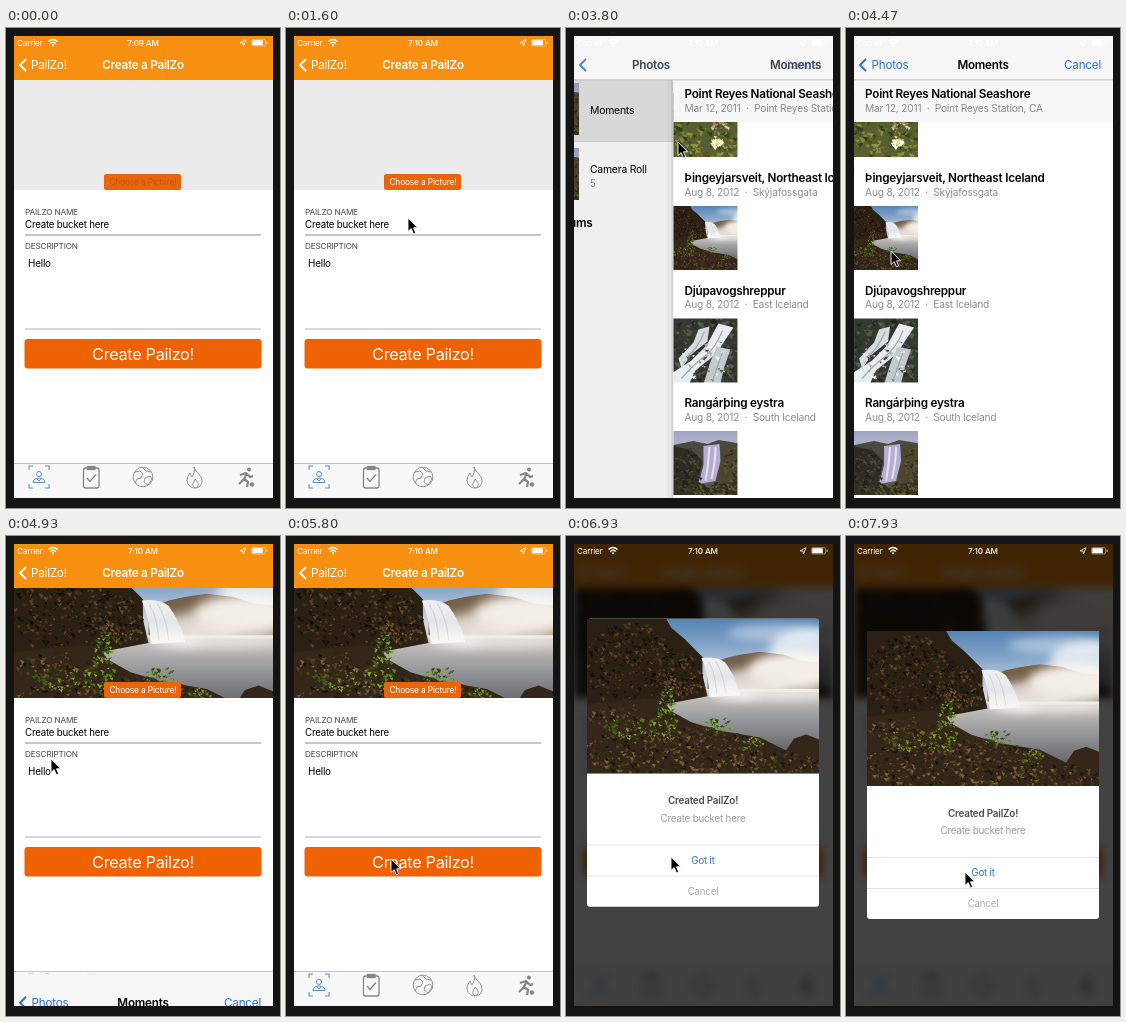
An HTML page that plays this animation: 274x480 px, repeating every 8000 ms.

```html
<!DOCTYPE html>
<html lang="en">
<head>
<meta charset="utf-8">
<style>
  html, body { margin: 0; width: 100%; height: 100%; overflow: hidden; background: #141414; }
  svg { display: block; width: 100%; height: 100%; }
  text { font-family: Inter, Roboto, sans-serif; letter-spacing: -.02em; white-space: pre; }
</style>
</head>
<body>
<svg id="stage" viewBox="0 0 274 480"></svg>
<script>
const LOOP = 8000, BLUE = '#2f6fd6', ORANGE = '#f79010', GREY = '#8b8b8f';
const $ = id => document.getElementById(id);

// Seeded random numbers for rocks and leaves
let seed = 7;
const rand = () => (seed = seed * 16807 % 2147483647) / 2147483647;

const rect = (x, y, w, h, fill, extra = '') =>
  `<rect x="${x}" y="${y}" width="${w}" height="${h}" fill="${fill}" ${extra}/>`;
const poly = (points, fill, extra = '') => `<polygon points="${points}" fill="${fill}" ${extra}/>`;
const mist = (cx, cy, rx, ry, fill, opacity) =>
  `<ellipse cx="${cx}" cy="${cy}" rx="${rx}" ry="${ry}" fill="${fill}" opacity="${opacity}" filter="url(#soft)"/>`;
const line = (d, stroke, width = 1, extra = '') =>
  `<path d="${d}" fill="none" stroke="${stroke}" stroke-width="${width}" ${extra}/>`;
const group = (id, body) => `<g id="${id}">${body}</g>`;
// Text is placed by the middle of its capitals
const text = (x, y, size, str, { fill = '#000', weight = 400, anchor = 'start', id = '' } = {}) =>
  `<text x="${x}" y="${y + size * .36}" font-size="${size}" fill="${fill}" font-weight="${weight}" text-anchor="${anchor}" ${id && `id="${id}"`}>${str}</text>`;
const photo = (id, x, y, w, h) => `<use href="#${id}" x="${x}" y="${y}" width="${w}" height="${h}"/>`;
const symbol = (id, w, h, body) =>
  `<symbol id="${id}" viewBox="0 0 ${w} ${h}" preserveAspectRatio="xMidYMid slice"><g filter="url(#lens)">${body}</g></symbol>`;
const gradient = (id, ...colors) => `<linearGradient id="${id}" x2="0" y2="1">` +
  colors.map((c, i) => `<stop offset="${i / (colors.length - 1)}" stop-color="${c}"/>`).join('') + '</linearGradient>';

// Scatter small shards over an ellipse, one path for each colour
function specks(n, cx, cy, rx, ry, size, colors) {
  const paths = colors.map(() => '');
  for (let i = 0; i < n; i++) {
    const a = rand() * 6.283, r = Math.sqrt(rand()), s = size * (.5 + rand()), lean = (rand() - .5) * s;
    const x = cx + rx * r * Math.cos(a), y = cy + ry * r * Math.sin(a);
    paths[i % colors.length] += `M${x.toFixed(1)} ${y.toFixed(1)}l${s.toFixed(1)} ${lean.toFixed(1)} ${(-s * .4).toFixed(1)} ${(s * .7).toFixed(1)}z`;
  }
  return paths.map((d, i) => `<path d="${d}" fill="${colors[i]}"/>`).join('');
}

const rock = ['#46331c', '#130e08', '#5c4424', '#1d150c'];
const earth = ['#5e4526', '#1a130b', '#7d6038', '#2c2013', '#463a1b'];
const leaf = ['#5f8424', '#3f5f18', '#86a436', '#2d4212'];

const landscape = symbol('landscape', 231, 154,
  rect(-5, -5, 241, 90, 'url(#sky)') + mist(190, 14, 50, 9, '#fff', .4) + mist(222, 30, 40, 20, '#fff', .7) +
  poly('120,46 138,39 152,36 172,33 196,36 214,42 236,44 236,70 120,70', '#75614a') +
  mist(206, 52, 46, 19, '#faf6f0', .95) + mist(165, 63, 36, 13, '#f0ebe4', .85) +
  rect(-5, 73, 241, 86, 'url(#lake)') + mist(190, 75, 55, 6, '#f4f1ec', .8) +
  poly('-5,-5 76,-5 84,9 97,20 115,38 115,56 120,77 62,88 -5,104', '#2b2014') +
  specks(320, 42, 45, 45, 42, 3.4, rock) + specks(110, 88, 54, 24, 22, 3.4, rock) +
  specks(80, 94, 66, 20, 9, 3, ['#745a33', '#4e3b21', '#2b2014']) +
  '<path d="M114 39Q130 37 138 44Q147 56 153 76L122 78Q121 55 114 39z" fill="url(#fall)"/>' +
  line('M121 43Q128 54 129 74M128 42Q136 55 138 74', '#cfd2d6', 1) + mist(146, 75, 24, 5, '#f7f5f2', .85) +
  poly('-5,86 38,81 74,79 84,92 104,103 130,111 172,118 198,131 206,119 218,115 236,122 236,159 -5,159', '#34271a') +
  specks(480, 84, 131, 92, 25, 3.6, earth) + specks(130, 185, 143, 44, 12, 3.6, earth) +
  specks(80, 35, 97, 34, 12, 3.4, earth) +
  specks(90, 45, 108, 30, 11, 2.8, leaf) + specks(95, 78, 95, 9, 27, 3.2, leaf) +
  specks(50, 128, 106, 15, 7, 3, leaf) + specks(45, 160, 124, 15, 7, 2.8, leaf));

const flowers = symbol('flowers', 64, 64,
  rect(-5, -5, 74, 74, '#56602e') +
  specks(260, 32, 32, 40, 40, 5, ['#7f8a3b', '#343d1d', '#8d9548', '#48521f', '#6b5a38']) +
  specks(14, 46, 32, 12, 4, 3, ['#c98b9b', '#dfc1bd']) +
  specks(22, 42, 48, 6, 6, 4.5, ['#fffbe0', '#f1dd6a', '#fff']));

const cascade = symbol('cascade', 64, 64,
  rect(-5, -5, 74, 74, '#363932') +
  specks(200, 32, 30, 40, 38, 5, ['#24271f', '#4d5636', '#5b5f59', '#30332d']) +
  poly('45,5 60,9 50,24 43,35 22,52 14,69 -5,69 -5,57 18,42 33,27', '#e9edf0') +
  poly('25,11 36,8 34,23 19,35 8,50 5,40 20,24', '#d5dbdf') +
  poly('43,28 57,31 51,48 46,69 29,69 36,46', '#c2cacd') +
  specks(45, 30, 40, 26, 24, 3.5, ['#f7f9fa', '#a9b2b5', '#4b504a']) +
  line('M49 12Q42 30 31 38T8 60M31 13Q24 30 14 38M49 34L39 62', '#9fa9ad', 1.2));

const gorge = symbol('gorge', 64, 64,
  rect(-5, -5, 74, 74, 'url(#dusk)') +
  poly('-5,15 20,10 34,13 45,9 69,13 69,69 -5,69', '#4b4a42') +
  poly('-5,14 18,19 29,30 25,50 -5,56', '#2c2b24') +
  poly('49,17 69,12 69,69 34,50 47,37', '#4c4530') +
  poly('30,15 46,13 47,30 42,50 25,53 30,34', '#b5aed2') +
  line('M36 16Q35 34 32 50M42 16Q42 30 38 48', '#e6e2f5', 2) + mist(33, 52, 9, 2, '#b9b3cf', .7) +
  poly('-5,51 18,49 34,55 69,49 69,69 -5,69', '#33311f') +
  specks(120, 12, 39, 14, 22, 3.5, ['#202018', '#494c30', '#38372d']) +
  specks(90, 42, 58, 24, 7, 3.5, ['#4d5a2a', '#292717', '#65583a']) +
  specks(45, 57, 33, 8, 17, 3.5, ['#5d5b33', '#302d20']));

const centered = { anchor: 'middle' };
const title = { anchor: 'middle', weight: 600 };
const chevron = (x, y, color) => line(`M${x + 6} ${y - 6}l-6 6 6 6`, color, 1.9);
const disclosure = y => line(`M251 ${y - 4}l4 4-4 4`, '#c5c5ca', 1.5);

const tabIcons =
  line('M23 442v-4h4M39 438h4v4M43 456v4h-4M27 460h-4v-4', '#5b8fd6', 1.1) +
  line('M30.500 446a2.500 2.500 0 1 1 5 0a2.500 2.500 0 1 1-5 0M27 454.500c0-6 12-6 12 0zM31 451l2 2 2-2', '#5b8fd6', 1) +
  `<g fill="none" stroke="#868686" stroke-width="1.3">
    <rect x="77.500" y="440" width="15.500" height="20" rx="2"/><rect x="81.500" y="438.500" width="7.500" height="3" fill="#868686"/><path d="M81 450l3 3.500 6-7"/>
    <g stroke-width=".9"><circle cx="137" cy="449" r="9.800"/>
    <path d="M129 444l5-1 3 3-2 4-4 1-2 4M137 440l3 3 5 1M139 450l5-2 2 3-4 6-4-3z"/>
    <path d="M188 439c2 6 8 8 8 14c0 4-3 7-7 7s-8-3-8-8c0-3 2-5 3-7c1 2 1 3 2 4c2-3 3-6 2-10zM189 460c-5-4 0-6 0-9c3 3 5 6 1 9"/></g>
    <path stroke-width="2.200" stroke-linejoin="round" d="M241 445l-3 6 4 3-1 5M238 451l-5 5M234 447l6-2 4 4 3-1"/>
  </g><circle cx="243" cy="441.500" r="2" fill="#868686"/><circle cx="246" cy="456.500" r="2.300" fill="#868686"/>`;

// Backgrounds run past the screen so that the blur has no dark rim
const form =
  rect(-12, -12, 298, 504, '#fff') + rect(-12, -12, 298, 64, ORANGE) +
  chevron(14, 37, '#fff') + text(25, 37, 11.7, 'PailZo!', { fill: '#fff' }) +
  text(137, 37, 11.7, 'Create a PailZo', { ...title, fill: '#fff' }) +
  rect(-12, 52, 298, 110, '#ececec') + group('hero', photo('landscape', 8, 52, 259, 110)) +
  rect(98, 146, 77, 16, '#e8650c', 'rx="2"') +
  text(137, 154, 8.4, 'Choose a Picture!', { ...centered, id: 'choose' }) +
  text(19, 184, 8.2, 'PAILZO NAME', { fill: '#444' }) + text(19, 197, 9.7, 'Create bucket here') +
  rect(19, 206.5, 236, 1, '#8e8e8e') +
  text(19, 218.5, 8.2, 'DESCRIPTION', { fill: '#444' }) + text(22, 235.5, 9.9, 'Hello') +
  rect(19, 300.5, 236, 1, '#b0b0b0') +
  rect(18.5, 311, 237, 29.5, '#ee6203', 'rx="3"') +
  text(137, 326, 16.3, 'Create Pailzo!', { ...centered, fill: '#fff' }) +
  rect(-12, 435, 298, 57, '#f8f8f8') + rect(-12, 435, 298, .8, '#b8b8b8') + tabIcons;

const albums =
  rect(8, 52, 259, 418, '#fff') + rect(8, 52, 259, 61, '#e6e6e6', 'id="pressed"') +
  photo('gorge', 13, 55, 48, 52) + text(72, 82, 10.4, 'Moments') + disclosure(83) +
  rect(13, 113, 254, .8, '#cfcfd2') +
  photo('gorge', 13, 120, 48, 52) + text(72, 141, 10.4, 'Camera Roll') +
  text(72, 155.5, 9.8, '5', { fill: GREY }) + disclosure(147) +
  text(13, 194.5, 11.7, 'My Albums', { weight: 600 }) +
  rect(8, 52, 400, 418, '#000', 'id="dim"');

const section = (y, name, date, place, image) =>
  photo(image, 8, y + 28, 64, 64) + text(19, y, 11.7, name, { weight: 600 }) +
  text(19, y + 14, 10.2, `${date}\u00a0\u00a0·\u00a0\u00a0${place}`, { fill: GREY });

const moments =
  rect(2, 52, 6, 418, '#000', 'opacity=".04"') + rect(6, 52, 2, 418, '#000', 'opacity=".08"') +
  rect(8, 52, 259, 418, '#fff') + photo('flowers', 8, 65, 64, 64) +
  rect(8, 52, 259, 42, '#f7f7f7') +
  text(19, 66, 11.7, 'Point Reyes National Seashore', { weight: 600 }) +
  text(19, 80, 10.2, 'Mar 12, 2011\u00a0\u00a0·\u00a0\u00a0Point Reyes Station, CA', { fill: GREY }) +
  section(150, 'Þingeyjarsveit, Northeast Iceland', 'Aug 8, 2012', 'Skýjafossgata', 'landscape') +
  section(262.5, 'Djúpavogshreppur', 'Aug 8, 2012', 'East Iceland', 'cascade') +
  section(375, 'Rangárþing eystra', 'Aug 8, 2012', 'South Iceland', 'gorge');

const pickerBar =
  rect(8, 8, 259, 44, '#f6f6f7') + rect(8, 51.5, 259, .8, '#b4b4b6') +
  group('back', chevron(14, 37, BLUE)) +
  text(0, 37, 11.7, 'Photos', { ...title, id: 'photosTitle' }) +
  text(0, 37, 11.7, 'Photos', { ...centered, fill: BLUE, id: 'backLabel' }) +
  text(0, 37, 11.7, 'Moments', { ...title, id: 'momentsTitle' }) +
  text(255, 37, 11.7, 'Cancel', { anchor: 'end', fill: BLUE, id: 'cancel' });

const dialog =
  rect(21, 95, 232, 288, '#fff', 'rx="3"') +
  `<g clip-path="url(#dialogTop)">${photo('landscape', 21, 95, 232, 155)}</g>` +
  text(137, 277, 9.9, 'Created PailZo!', { ...title, fill: '#4c4c4c' }) +
  text(137, 294.5, 9.8, 'Create bucket here', { ...centered, fill: '#9a9a9a' }) +
  rect(21, 321, 232, .8, '#dcdcdc') + rect(21, 352, 232, .8, '#dcdcdc') +
  text(137, 337, 9.7, 'Got it', { ...centered, fill: BLUE }) +
  text(137, 368, 9.7, 'Cancel', { ...centered, fill: '#a8a8a8' });

const statusBar =
  text(11, 15, 8.2, 'Carrier', { fill: '#fff' }) +
  line('M42.500 13.500q4.500-4 9 0M44.300 15.500q2.700-2.400 5.400 0', '#fff', 1.4) +
  '<circle cx="47" cy="17.300" r="1.100" fill="#fff"/>' +
  text(137, 15, 8.2, '', { ...centered, fill: '#fff', weight: 500, id: 'clock' }) +
  line('M240 11.800L234 14.800 237 15.200 237.400 18z', '#fff', .8) +
  rect(245.5, 11.5, 14, 6.5, 'none', 'rx="1.500" stroke="#fff" stroke-width=".6" stroke-opacity=".6"') +
  rect(246.3, 12.2, 10.5, 5.1, '#fff') + rect(260.5, 13.5, 1.2, 2.5, '#fff', 'opacity=".6"');

$('stage').innerHTML = `<defs>
  ${gradient('sky', '#4d7db2', '#7fa2c6', '#c5d2dd', '#eeeae4')}
  ${gradient('lake', '#c9c6c1', '#96979a', '#66686a', '#4d4a46')}
  ${gradient('fall', '#f1f1f2', '#e4e6e9', '#fafafa')}
  ${gradient('dusk', '#9aa0bd', '#c6c5d8', '#77758a')}
  <filter id="soft" x="-50%" y="-100%" width="200%" height="300%"><feGaussianBlur stdDeviation="5"/></filter>
  <filter id="lens"><feGaussianBlur stdDeviation=".6"/></filter>
  <clipPath id="screen">${rect(8, 8, 259, 462, '#000')}</clipPath>
  <clipPath id="dialogTop">${rect(21, 95, 232, 155, '#000')}</clipPath>
  ${landscape}${flowers}${cascade}${gorge}</defs>
  ${rect(0, 0, 274, 480, '#141414')}
  <g clip-path="url(#screen)">
    ${group('form', form)}
    ${group('picker', group('albums', albums) + group('moments', moments) + pickerBar)}
    ${rect(8, 8, 259, 462, '#000', 'id="shade"')}
    ${group('dialog', dialog)}${statusBar}
  </g>
  <path id="cursor" d="M0 0V13.500L3.200 10.600 5.400 15.800 7.700 14.900 5.500 9.800H9.700Z" fill="#000" stroke="#fff" stroke-width=".9"/>`;

const clamp = v => Math.min(1, Math.max(0, v));
const ramp = (t, from, to) => clamp((t - from) / (to - from));

// Remaining distance, 1 to 0, of a critically damped move
function settle(ms) {
  const u = Math.max(0, ms) * .0131;
  return (1 + u) * Math.exp(-u);
}
// The same for a move that overshoots
function bounce(ms) {
  const t = Math.max(0, ms) / 1000;
  return Math.exp(-11.5 * t) * (Math.cos(15.3 * t) + .75 * Math.sin(15.3 * t));
}

const cursorPath = [
  [670, 152, 434], [1470, 122, 190], [1600, 122, 190], [2070, 114, 156], [2850, 114, 156],
  [3300, 112, 108], [3640, 112, 108], [3800, 112, 114], [4350, 45, 223], [5130, 45, 223],
  [5750, 105, 323], [6600, 105, 323], [6900, 105, 321], [7050, 105, 321], [7850, 119, 336], [LOOP, 119, 336]];

function cursorAt(t) {
  const i = Math.max(1, cursorPath.findIndex(k => k[0] >= t));
  const [t0, x0, y0] = cursorPath[i - 1], [t1, x1, y1] = cursorPath[i];
  const u = ramp(t, t0, t1), e = u * u * (3 - 2 * u);
  return [x0 + (x1 - x0) * e, y0 + (y1 - y0) * e];
}

const move = (id, x, y) => $(id).setAttribute('transform', `translate(${x} ${y})`);
const fade = (id, opacity) => $(id).setAttribute('opacity', clamp(opacity));
const show = (id, on) => $(id).style.display = on ? '' : 'none';

const OPEN = 2500, PUSH = 3642, CLOSE = 4600, CONFIRM = 6630;

function draw(t) {
  $('clock').textContent = t < 1000 ? '7:09 AM' : '7:10 AM';
  $('choose').setAttribute('fill', t < 70 ? '#c4560e' : t < 130 ? '#f3b78c' : '#fff');
  show('hero', t >= CLOSE);

  show('picker', t >= OPEN && t < 5130);
  move('picker', 0, 462 * (t < CLOSE ? settle(t - OPEN) : 1 - settle(t - CLOSE)));
  const rest = settle(t - PUSH), p = 1 - rest;
  show('pressed', t >= 3560);
  move('albums', -78 * p, 0);
  fade('dim', .1 * p);
  show('moments', t >= PUSH);
  move('moments', 259 * rest, 0);
  const labelX = 137 - 93 * p ** 1.2;
  $('photosTitle').setAttribute('x', labelX);
  $('backLabel').setAttribute('x', labelX);
  $('momentsTitle').setAttribute('x', 137 + 241 * rest);
  fade('photosTitle', 1.9 * rest);
  fade('backLabel', 2 * p - 1);
  fade('momentsTitle', 1.2 * p);
  fade('back', 1.4 * p);
  fade('cancel', Math.max(.45, Math.abs(2 * p - 1)));

  const shade = ramp(t, CONFIRM, CONFIRM + 280);
  fade('shade', .74 * shade);
  $('form').style.filter = shade ? `blur(${4 * shade}px)` : '';
  show('dialog', t >= CONFIRM);
  move('dialog', 0, 462 * bounce(t - CONFIRM));

  show('cursor', t >= 670);
  move('cursor', ...cursorAt(t));
}

function tick() {
  draw(performance.now() % LOOP);
  requestAnimationFrame(tick);
}
tick();
</script>
</body>
</html>
```
